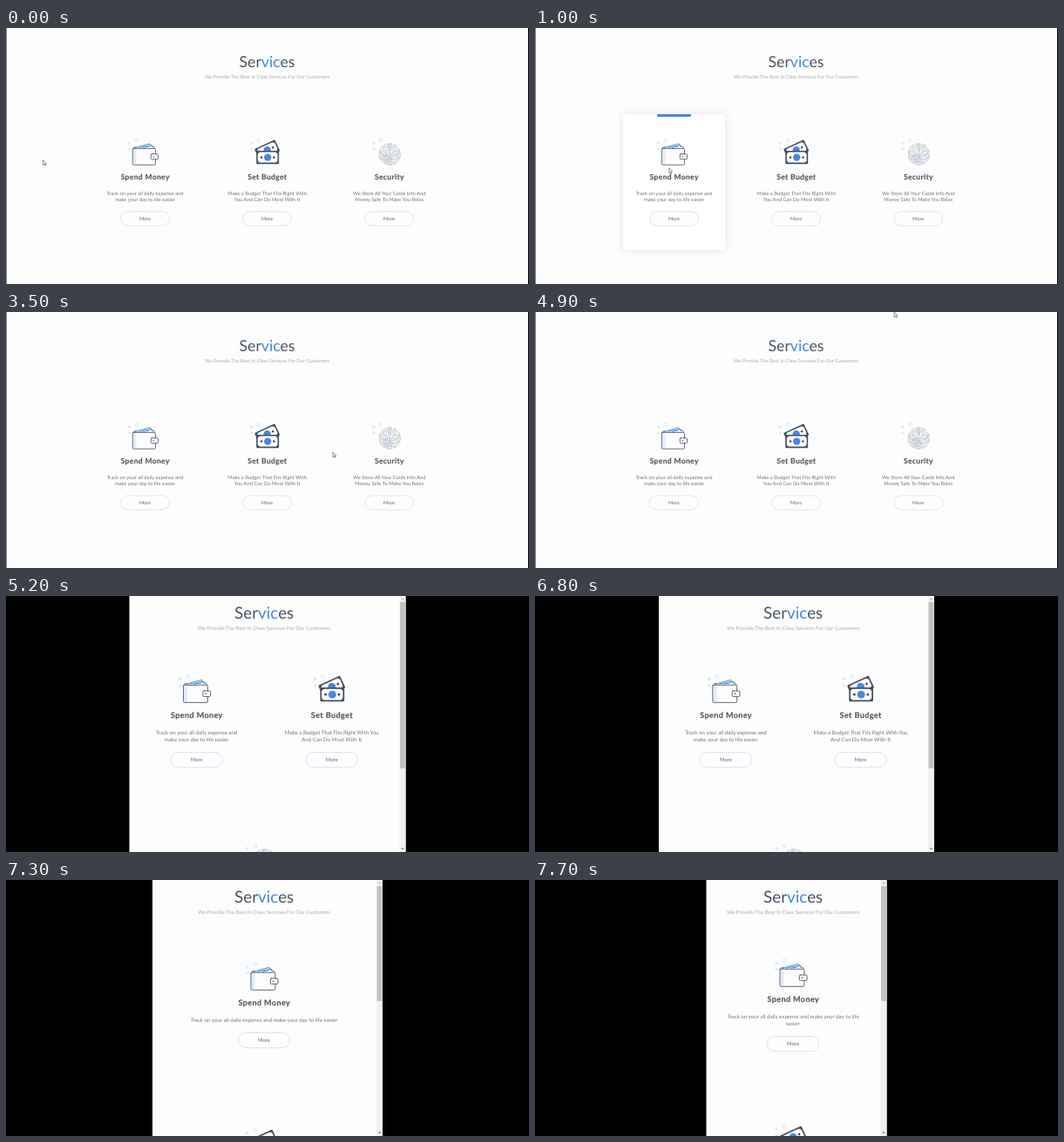
Write an HTML page that moves like this. It is 600 px wide and 294 px high and loops after 8000 ms.

```html
<!DOCTYPE html>
<html lang="en">
<head>
<meta charset="utf-8">
<title>Services</title>
<style>
  html, body { margin: 0; width: 100%; height: 100%; overflow: hidden; background: #000; }
  svg { display: block; width: 100vw; height: 100vh; }
  text { font-family: Lato, "Open Sans", sans-serif; text-anchor: middle; text-rendering: geometricPrecision; }
  .title { font-size: 17.7px; fill: #4b5661; }
  .title tspan { fill: #4488dc; }
  .sub { font-size: 5.67px; fill: #a9abae; }
  .head { font-size: 8.5px; font-weight: 700; letter-spacing: .36px; fill: #50575e; stroke: #50575e; stroke-width: .15; }
  .copy { font-size: 5.8px; fill: #75787c; }
  .label { font-size: 5.6px; fill: #62666b; }
  .panel rect:first-child { fill: #fff; filter: drop-shadow(0 0 5px rgba(40, 50, 70, .13)); }
  .ink { stroke: #566270; fill: none; stroke-width: .9; stroke-linejoin: round; stroke-linecap: round; }
  .ridge { stroke: #909ba6; fill: none; stroke-width: .65; }
  .sky { stroke: #c8def3; fill: none; stroke-width: .75; }
  .blue { stroke: #4788d8; fill: none; stroke-width: .9; stroke-linejoin: round; stroke-linecap: round; }
</style>
</head>
<body>
<svg id="stage" viewBox="0 0 600 294" preserveAspectRatio="none">
  <rect width="600" height="294"/>
  <rect id="page" height="294" fill="#fdfdfe"/>
  <g id="intro">
    <text class="title" y="6.9">Ser<tspan>vic</tspan>es</text>
    <text class="sub" y="19.2">We Provide The Best In Class Services For Our Customers</text>
  </g>
  <g id="cards"></g>
  <g id="bar">
    <rect width="7" height="294" fill="#f1f1f2"/>
    <rect id="thumb" x=".6" y="7" width="5.8" fill="#c1c1c2"/>
    <path d="M2 4.2L3.5 2.6 5 4.2Z" fill="#a3a3a3"/>
    <path d="M2 289.6L3.5 291.2 5 289.6Z" fill="#505050"/>
  </g>
  <g id="cursor" fill="#fff" stroke="#454c54" stroke-width=".6" stroke-linejoin="round">
    <path id="arrow" d="M0 0V5.7L1.3 4.6 2.2 6.5 3 6.2 2.2 4.3H3.9Z"/>
    <path id="hand" d="M.2 4.6V.7Q.8-.2 1.4.7V3.2L4.6 4Q5.2 4.2 5 5.4L4.4 8H1L-1.2 5.2Q-1.2 4 .2 5Z"/>
  </g>
</svg>
<script>
const LOOP = 8000, STEP = 50, SWITCH = 5200, FADE = 150, ZOOM = 1.065;
const $ = id => document.getElementById(id);

const sparkles = `<path class="sky" d="M-20-39h4M-18-41v4M-19.6-32h3.2M-18-33.6v3.2"/>
  <circle class="sky" cx="-9.7" cy="-41.7" r="1.8"/>`;

const wallet = `<rect x="-13.4" y="-31" width="3.4" height="16.5" fill="#dfecf9"/>
  <path class="blue" d="M-11.5-33.6L5.5-38.2 6.2-36.4M-7-33.6L7-36.6M-2-33.6L5-35"/>
  <path class="ink" d="M12-26V-31.5Q12-32.6 10.8-32.6H-12.5Q-14.2-32.6-14.2-31V-15.2Q-14.2-13.8-12.8-13.8H10.6Q12-13.8 12-15.2V-20M-14.2-31.4Q-14-34-12-34H-10M7-36H8V-34.6H10Q11-34.6 11-32.8"/>
  <rect class="ink" x="6.8" y="-26.3" width="8.2" height="6" rx="1"/>
  <circle cx="10" cy="-23.3" r=".8" fill="#566270"/>`;

const note = (w, h) => `<rect width="${w}" height="${h}" rx=".6" fill="#fff" stroke="#43505c" stroke-width="1.6"/>
  <path d="M0 0h3.6L0 3.6ZM${w} 0v3.6l-3.6-3.6ZM0 ${h}v-3.6l3.6 3.6ZM${w} ${h}h-3.6l3.6-3.6Z" fill="#43505c"/>
  <circle cx="${w / 2}" cy="${h / 2}" r="4.2" fill="#4788de"/>
  <circle cx="5" cy="${h / 2}" r="1.3" fill="#43505c"/><circle cx="${w - 5}" cy="${h / 2}" r="1.3" fill="#43505c"/>`;
const cash = `<g transform="translate(-13.6 -31.6) rotate(-25)">${note(24.2, 13)}</g>
  <g transform="translate(-11.6 -29.2)">${note(24.4, 13.6)}</g>`;

function fingerprint() {
  let s = '<ellipse cx="-2" cy="-21.5" rx="6" ry="5.5" fill="#e0edfa"/>';
  for (let i = 0; i < 7; i++) {
    const r = 1 + i * 1.85;
    s += `<circle class="ridge" cx=".5" cy="-26" r="${r}"
      stroke-dasharray="${2 + i * .7} ${1.2 + i % 2 * .3}" transform="rotate(${i * 67} .5 -26)"/>`;
  }
  return s;
}

// breaks: words on the first line for desktop, tablet and phone
const cards = [
  { head: 'Spend Money', icon: wallet, breaks: [7, 7, 12], hover: [450, 2650],
    copy: 'Track on your all daily expense and make your day to life easier' },
  { head: 'Set Budget', icon: cash, breaks: [7, 8, 13], hover: [2800, 3350],
    copy: 'Make a Budget That Fits Right With You And Can Do Most With It' },
  { head: 'Security', icon: fingerprint(), breaks: [7, 7, 12], hover: [3550, 4600],
    copy: 'We Store All Your Cards Info And Money Safe To Make You Relax' }
];
const press = [1850, 2200];

for (const c of cards) {
  const g = document.createElementNS('http://www.w3.org/2000/svg', 'g');
  g.innerHTML = `<g class="panel"><rect x="-58.5" y="-72" width="117" height="156" rx="2"/>
      <path d="M-19.5-72h39v1.2q0 1.8-1.8 1.8h-35.4q-1.8 0-1.8-1.8Z" fill="#4788d8"/></g>
    ${sparkles}${c.icon}
    <text class="head" x=".2" y="2.9">${c.head}</text>
    <text class="copy" y="20.9"></text><text class="copy" y="28.4"></text>
    <g class="button"><rect x="-27.9" y="-8.1" width="55.8" height="16.2" rx="8.1" fill="#fefeff" stroke="#cddff2" stroke-width=".75"/>
      <rect class="fill" x="-28.2" y="-8.4" width="56.4" height="16.8" rx="8.4" fill="#5a96de" opacity="0"/>
      <text class="label" y="2">More</text></g>`;
  $('cards').append(g);
  c.g = g;
  c.panel = g.querySelector('.panel');
  c.lines = g.querySelectorAll('.copy');
  c.button = g.querySelector('.button');
  c.fill = g.querySelector('.fill');
  c.label = g.querySelector('.label');
  c.words = c.copy.split(' ');
}

// time, x, y
const path = [
  [0, 42.5, 151.5], [50, 45, 152], [450, 100, 157], [850, 150, 160], [1250, 160, 162], [1550, 160, 162],
  [1800, 168, 203], [2050, 175.3, 222.5], [2100, 176, 221], [2200, 179, 208], [2350, 184, 197],
  [2450, 185, 196], [3100, 300, 172], [3250, 312, 170], [3300, 340, 170], [3350, 362, 168],
  [3500, 375, 160.8], [4000, 438, 146], [4400, 438, 146], [4900, 412, 0]
];
const widths = [[6750, 317], [6800, 316], [7050, 292], [7300, 264], [7600, 210], [7650, 210], [7700, 207]];

function at(table, t, col) {
  let i = table.findIndex(row => row[0] > t);
  if (i < 0) return table[table.length - 1][col];
  if (!i) return table[0][col];
  const a = table[i - 1], b = table[i];
  return a[col] + (b[col] - a[col]) * (t - a[0]) / (b[0] - a[0]);
}
const clamp = v => Math.max(0, Math.min(1, v));
const glow = ([on, off], t) => Math.min(clamp((t - on) / FADE), clamp(1 - (t - off) / FADE));
const place = (el, x, y, k = 1) => el.setAttribute('transform', `translate(${x} ${y}) scale(${k})`);

function setCard(c, x, y, k, split) {
  place(c.g, x, y, k);
  const one = split >= c.words.length;
  c.lines[0].textContent = c.words.slice(0, split).join(' ');
  c.lines[1].textContent = c.words.slice(split).join(' ');
  place(c.button, 0, one ? 40.5 : 48);
}

function setPage(x, w) {
  $('page').setAttribute('x', x);
  $('page').setAttribute('width', w);
}

function desktop(t) {
  setPage(.5, 598.5);
  place($('intro'), 299.5, 38.5);
  cards.forEach((c, i) => {
    setCard(c, 159.5 + i * 140.1, 171, 1, c.breaks[0]);
    c.panel.setAttribute('opacity', glow(c.hover, t));
  });
  const lit = glow(press, t);
  cards[0].fill.setAttribute('opacity', lit);
  cards[0].label.style.fill = lit > .5 ? '#fff' : '';
  place($('cursor'), at(path, t, 1), at(path, t, 2));
  const over = t >= press[0] && t < press[1];
  $('hand').style.display = over ? '' : 'none';
  $('arrow').style.display = over ? 'none' : '';
}

function responsive(t) {
  const w = at(widths, t, 1), left = 300 - w / 2, inner = w - 7, mid = left + inner / 2;
  const tablet = w > 310;
  setPage(left, w);
  place($('intro'), mid - .3, 19, ZOOM);
  place($('bar'), left + inner, 0);
  $('thumb').setAttribute('height', tablet ? 191 : 132);
  cards.forEach((c, i) => {
    c.panel.setAttribute('opacity', 0);
    if (tablet) {
      const x = i < 2 ? mid + (i - .5) * inner / 2 : mid;
      setCard(c, x - .3, i < 2 ? 137 : 331.5, ZOOM, c.breaks[1]);
    } else {
      const one = inner > 213;
      setCard(c, mid - .4, (one ? 141 : 137) + i * 191, ZOOM, one ? c.words.length : c.breaks[2]);
    }
  });
}

function draw(now) {
  const t = Math.floor(now % LOOP / STEP) * STEP;
  const wide = t < SWITCH;
  $('cursor').style.display = wide ? '' : 'none';
  $('bar').style.display = wide ? 'none' : '';
  (wide ? desktop : responsive)(t);
}

const start = performance.now();
function tick() {
  draw(performance.now() - start);
  requestAnimationFrame(tick);
}
tick();
</script>
</body>
</html>
```
